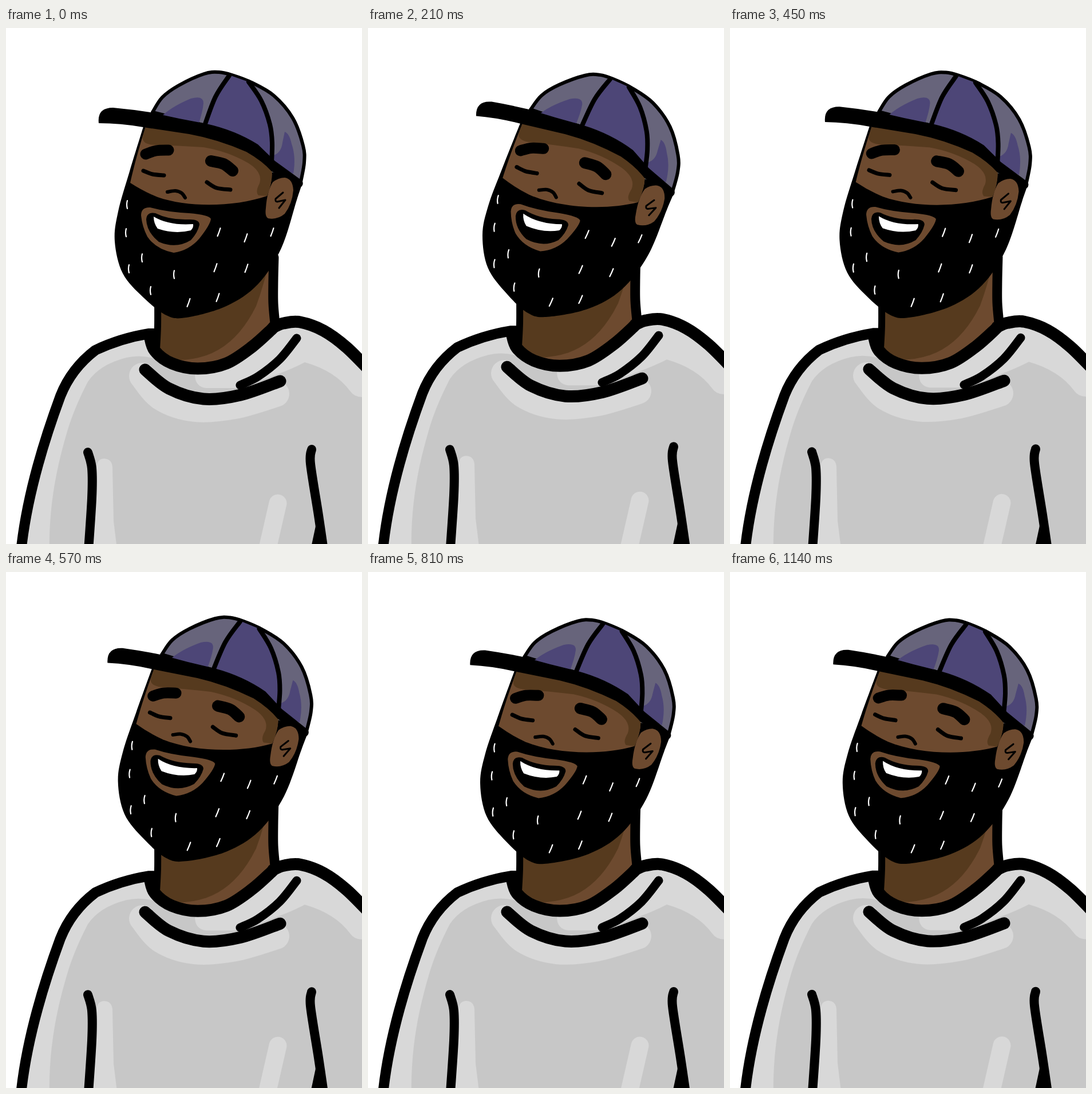
Recreate the animation shown at these times as an HTML page. Size 622x900 px, loop 1170 ms.

```html
<!DOCTYPE html>
<html lang="en">
<head>
<meta charset="utf-8">
<title>Nodding man in a cap</title>
<style>
html, body { margin: 0; width: 100%; height: 100%; overflow: hidden; background: #fff; }
svg { display: block; width: 622px; height: 900px; }
</style>
</head>
<body>
<svg viewBox="0 0 622 900" stroke-linecap="round" stroke-linejoin="round">
  <g id="body"></g>
  <g id="head"></g>
</svg>
<script>
const LOOP = 1170, STEP = 30;
const SKIN = '#6d4a2f', SHADE = '#563a1e', PURPLE = '#4d4677', SLATE = '#67647b';
const CLOTH = '#c7c7c7', LIGHT = '#d8d8d8', INK = '#000';
const body = document.getElementById('body');
const head = document.getElementById('head');

// Smooth open curve through a few points.
function curve(text) {
  const p = text.split(' ').map(s => s.split(',').map(Number));
  const at = i => p[Math.max(0, Math.min(p.length - 1, i))];
  let d = 'M' + p[0];
  for (let i = 0; i < p.length - 1; i++) {
    const [a, b, c, e] = [at(i - 1), at(i), at(i + 1), at(i + 2)];
    const c1 = b.map((v, k) => v + (c[k] - a[k]) / 6);
    const c2 = c.map((v, k) => v - (e[k] - b[k]) / 6);
    d += 'C' + c1 + ' ' + c2 + ' ' + c;
  }
  return d;
}

function path(parent, d, color, stroke = 'none', width = 0) {
  const el = document.createElementNS('http://www.w3.org/2000/svg', 'path');
  const attrs = { d, fill: color, stroke, 'stroke-width': width };
  for (const k in attrs) el.setAttribute(k, attrs[k]);
  parent.appendChild(el);
}
const line = (parent, color, width, pts) => path(parent, curve(pts), 'none', color, width);

function drawNeck() {
  path(body, 'M264 400H468V525Q420 597 335 597L264 570Z', SKIN);
  path(body, 'M264 400H462Q450 450 437 485Q404 552 350 571Q320 581 290 579L264 570Z', SHADE);
  line(body, INK, 12, '265,470 265,520 263,560');
  line(body, INK, 17, '468,400 467,440 467,480 470,515');
}

function drawShirt() {
  const sleeve = 'M25 925C34 820 68 715 95 642Q114 594 156 562Q200 541 250 533';
  const shoulder = '467,522 485,515 514,513 555,528 595,557 640,602';
  path(body, sleeve + 'Q260 594 335 594Q410 590 466 524Q500 506 545 523Q590 543 640 595V925Z', CLOTH);
  path(body, sleeve + 'L262 577Q235 569 210 575Q163 587 143 617Q118 665 106 707C86 775 74 840 76 925Z', LIGHT);
  path(body, 'M330 604L385 590Q430 570 466 524Q520 508 575 545L640 600V640Q613 650 601 633' +
    'Q575 598 522 583Q480 605 400 628H350Q330 626 330 604Z', LIGHT);
  line(body, LIGHT, 46, '238,607 272,645 330,664 400,659 472,638');
  path(body, 'M158 765Q160 751 172 751Q185 752 186 766L188 860L196 925H148Z', LIGHT);
  line(body, LIGHT, 31, '475,829 453,925');
  // outline and collar
  path(body, sleeve + 'H258', 'none', INK, 18);
  line(body, INK, 21, '251,537 260,563 290,585 335,594 385,585 430,556 466,524');
  line(body, INK, 21, shoulder);
  // folds and arm creases
  line(body, INK, 21, '243,596 285,629 345,647 410,640 479,616');
  line(body, INK, 15, '409,623 440,608 478,578 508,541');
  line(body, INK, 16, '143,740 150,768 150,820 143,925');
  line(body, INK, 16, '534,735 532,760 546,850 557,925');
  path(body, 'M545 850L529 925H567Z', INK);
}

function drawFace() {
  path(head, curve('240,172 216,250 196,320 190,372 204,428 240,470 280,501 315,505 ' +
    '385,485 440,447 481,384 508,300 518,270') + 'Z', INK);
  const top = 'M244 172L320 180L420 208L464 246Q467 265 456 293';
  path(head, top + 'C400 312 320 314 265 295Q240 285 217 270Q227 225 244 172Z', SKIN);
  path(head, top + 'L441 292Q435 286 443 271Q449 252 424 236Q388 215 345 208' +
    'Q300 205 260 204Q237 203 239 190Z', SHADE);
  line(head, INK, 19, '244,220 262,214 284,213');
  line(head, INK, 20, '358,232 380,237 396,249');
  line(head, INK, 7, '240,249 256,255 276,257');
  line(head, INK, 7, '351,269 368,279 392,282');
  line(head, INK, 6, '282,286 296,284 307,288 313,296');
}

function drawMouth() {
  path(head, 'M236 327Q236 312 252 313Q280 321 320 323Q355 326 358 333Q357 343 338 367' +
    'Q320 388 293 392Q262 386 247 364Q238 347 236 327Z', SKIN);
  path(head, 'M245 334Q246 320 261 323Q285 335 318 334Q338 333 338 343Q335 357 323 370' +
    'Q297 386 267 373Q246 356 245 334Z', INK);
  path(head, 'M258 329Q285 345 327 342Q328 348 323 353Q295 360 265 350Q258 341 258 329Z', '#fff');
}

// Short grey hairs, upright on the left cheek and leaning on the right.
function drawHairs() {
  const spots = '212,308 210,357 238,401 215,420 294,430 253,458 319,479 370,470 366,418 420,419 419,366 372,356 465,356';
  for (const spot of spots.split(' ')) {
    const [x, y] = spot.split(',').map(Number);
    const lean = x < 300 ? 0 : 2.5;
    path(head, `M${x + lean} ${y - 7}q-2 7 ${-2 * lean} 14`, 'none', '#fff', 2.2);
  }
}

function drawCap() {
  path(head, curve('256,147 273,121 302,100 346,80 372,77 395,82 429,95 468,118 501,157 519,205 521,235 514,273') +
    'Q470 230 400 185L340 168Z', SLATE, INK, 6);
  path(head, 'M390 82Q358 120 346 172L400 186L465 236Q470 145 424 94Z', PURPLE);
  path(head, 'M270 156Q287 138 323 123Q345 117 345 131Q344 145 336 169Z', PURPLE);
  path(head, 'M487 181Q495 184 499 202Q507 225 502 254L466 238L468 222Q481 217 483 200Z', PURPLE);
  line(head, INK, 8, '390,83 366,120 347,170');
  line(head, INK, 8, '424,94 446,127 461,168 465,200 464,236');
  // brim and band
  path(head, 'M162 166Q159 139 187 139Q220 142 252 147Q300 158 350 167Q400 178 440 203L470 232' +
    'L517 266Q521 272 516 277L500 275L464 250Q448 232 420 216Q370 194 320 185L240 173Q200 166 162 166Z', INK);
}

function drawEar() {
  path(head, 'M487 261Q501 263 502 283Q500 307 487 324Q474 335 458 332Q452 329 454 314' +
    'Q456 285 466 269Q476 261 487 261Z', SKIN);
  path(head, 'M484 287L471 298Q470 303 474 303L488 300L477 314', 'none', INK, 3);
}

const ease = u => (1 - Math.cos(Math.PI * Math.max(0, Math.min(1, u)))) / 2;

// Turning points of the sway: [ms, radians].
const TURNS = [[0, 0], [245, .086], [460, .012], [680, .082], [930, .022], [1140, .056]];

function sway(t) {
  const i = Math.max(1, TURNS.findIndex(k => k[0] >= t));
  const [t0, a0] = TURNS[i - 1], [t1, a1] = TURNS[i];
  return a0 + (a1 - a0) * ease((t - t0) / (t1 - t0));
}

function render(ms) {
  const t = Math.floor((ms % LOOP) / STEP) * STEP;
  const turn = sway(t);
  const dip = 4.2 * ease((t - 570) / 240) - 25 * turn;
  body.setAttribute('transform', `translate(0 ${-59 * turn})`);
  head.setAttribute('transform', `translate(0 ${dip}) rotate(${turn * 180 / Math.PI} 304 490)`);
}

[drawNeck, drawShirt, drawFace, drawMouth, drawHairs, drawCap, drawEar].forEach(draw => draw());
const start = performance.now();
function tick() {
  render(performance.now() - start);
  requestAnimationFrame(tick);
}
tick();
</script>
</body>
</html>
```
